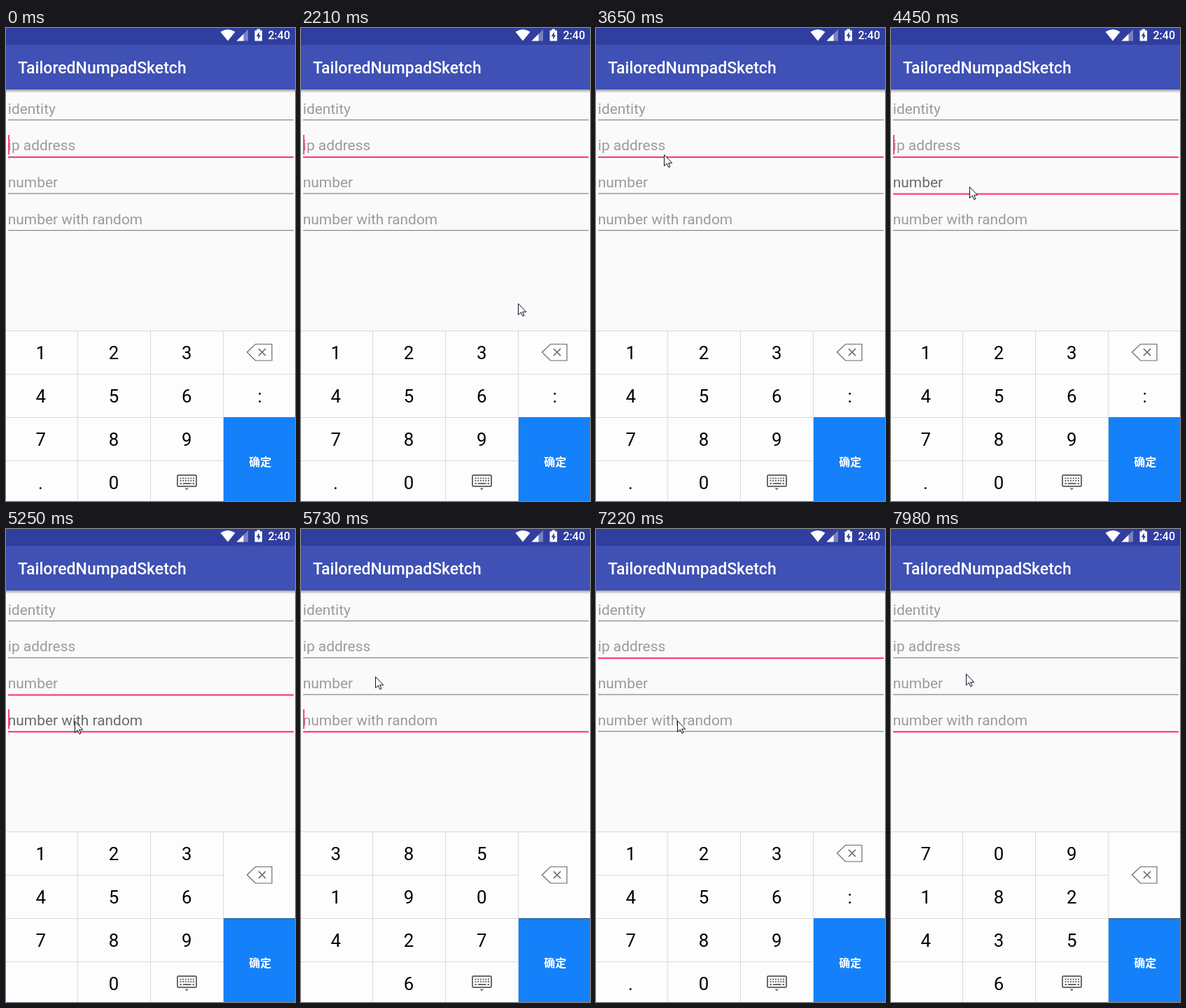
These frames come from a looping animation (413 px wide and 677 px high, 8 s). An HTML page:

```html
<!DOCTYPE html>
<html lang="zh-CN">
<head>
<meta charset="utf-8">
<title>Numpad demo</title>
<style>
html, body { margin: 0; width: 100%; height: 100%; overflow: hidden; background: #fafafa; }
svg { display: block; width: 413px; height: 677px; font-family: Roboto, sans-serif; }
.key { font-size: 25.8px; text-anchor: middle; }
.hint { font-size: 20.9px; }
.white { fill: #fff; font-weight: 500; }
.ok { font: 700 16px 'Noto Sans CJK SC', 'Noto Sans CJK', sans-serif; text-anchor: middle; }
.grid { stroke: #d9d9d9; fill: none; }
.icon { stroke: #6a6a6a; fill: none; }
</style>
</head>
<body>
<svg viewBox="0 0 413 677">
  <defs>
    <linearGradient id="shade" x2="0" y2="1">
      <stop stop-opacity=".35"/>
      <stop offset="1" stop-opacity="0"/>
    </linearGradient>
  </defs>
  <rect width="413" height="677" fill="#fafafa"/>
  <rect width="413" height="88" fill="#3f51b5"/>
  <rect width="413" height="24" fill="#303f9f"/>
  <rect y="88" width="413" height="5" fill="url(#shade)"/>
  <text class="white" x="17" y="65" font-size="23">TailoredNumpadSketch</text>

  <!-- status icons -->
  <path d="M317 18.5L306.5 5.5Q317-1.5 327.5 5.5Z" fill="#fff"/>
  <path d="M329.5 18.5H346V2Z" fill="#fff" opacity=".35"/>
  <path d="M329.5 18.5H339.5V8.5Z" fill="#fff"/>
  <path d="M355.5 3.5H358.5V1.5H363V3.5H366V18.5H355.5Z" fill="#fff"/>
  <path d="M361.8 5.5L357.7 11.8H360.2V16.5L364 10.2H361.8Z" fill="#303f9f"/>
  <text class="white" x="374.5" y="16.3" font-size="16">2:40</text>

  <g id="fields"></g>
  <rect id="caret" x="3" width="2" height="28" fill="#ff4081"/>

  <!-- keyboard -->
  <rect y="433" width="413" height="244" fill="#fdfdfd"/>
  <path class="grid" d="M0 433.5H413M0 495.5H310M0 557.5H310M0 619.5H310M102.5 433V677M206.5 433V677M310.5 433V677"/>
  <rect x="311" y="557" width="102" height="120" fill="#1481fa"/>
  <text class="white ok" x="363.3" y="626.5">确定</text>
  <g id="digits"></g>
  <g id="ipKeys">
    <path class="grid" d="M311 495.5H413"/>
    <text class="key" x="362.5" y="536">:</text>
    <text class="key" x="49.5" y="660">.</text>
  </g>
  <path id="edge" d="M311 557.5H413" stroke="#30587f"/>
  <g id="del" class="icon">
    <path d="M344.5 0L356.5-11.5H380V12H356.5Z" stroke-width="1.2"/>
    <path d="M361-5L371 5M371-5L361 5" stroke-width="1.7"/>
  </g>
  <g class="icon" stroke-width="2">
    <rect x="245" y="640" width="27" height="16" rx="1.5"/>
    <path d="M248.5 644.5H269M248.5 648H269" stroke-dasharray="2 1.7"/>
    <path d="M248.5 652H251M253 652H264.5M266.5 652H269"/>
    <path d="M255.5 658.5H261L258.3 661.5Z" fill="#6a6a6a" stroke="none"/>
  </g>

  <path id="cursor" d="M.5.5V16.5L4.3 13L6.8 18.5L9 17.5L6.6 12.3H11.7Z" fill="#fff" stroke="#112"/>
</svg>
<script>
const LOOP = 8000, PITCH = 52.7, BLINK = 500;
const FOCUS_DELAY = 40, BOARD_DELAY = 80, PRESS = 120;
const IP = 1, NUM = 2, RAND = 3;
const ORDERED = '1234567890';
const $ = id => document.getElementById(id);

const tap = (time, row, keys = ORDERED) => ({ time, row, keys });
const taps = [
  tap(-BOARD_DELAY, IP),
  tap(4450, NUM),
  tap(5210, RAND, '3851904276'),
  tap(6340, NUM),
  tap(6600, IP),
  tap(7440, RAND, '7091824356')
];

// the pointer glides to (x, y) between two times and rests until the next move
const move = (from, to, x, y) => ({ from, to, x, y });
const moves = [
  move(120, 120, 329, 651),
  move(120, 360, 310, 394),
  move(2450, 2590, 300, 471),
  move(2590, 2970, 116, 236),
  move(2970, 3370, 97, 180),
  move(3610, 4050, 112, 227),
  move(4530, 4850, 98, 275),
  move(5330, 5730, 106, 211),
  move(6380, 6540, 107, 162),
  move(6720, 7220, 116, 274),
  move(7540, 7980, 107, 207)
];

const add = (parent, tag, attrs, text = '') => {
  const el = document.createElementNS('http://www.w3.org/2000/svg', tag);
  for (const k in attrs) el.setAttribute(k, attrs[k]);
  el.textContent = text;
  return parent.appendChild(el);
};

const fields = ['identity', 'ip address', 'number', 'number with random'].map((name, i) => ({
  hint: add($('fields'), 'text', { class: 'hint', x: 2.8, y: Math.floor(123 + i * PITCH) }, name),
  line: add($('fields'), 'rect', { x: 3, y: 131 + i * PITCH, width: 408 })
}));

const digits = [...ORDERED].map((d, i) => add($('digits'), 'text', {
  class: 'key',
  x: 49.8 + (i === 9 ? 1 : i % 3) * 104.2,
  y: 474 + Math.floor(i / 3) * 62
}, d));

const lastTap = t => taps.findLast(p => p.time <= t);
const smooth = k => k * k * (3 - 2 * k);

function cursorAt(t) {
  const i = moves.findLastIndex(m => m.from <= t);
  const b = moves[i], a = moves[i - 1];
  const k = smooth(Math.min(1, (t - b.from) / (b.to - b.from)));
  return [a.x + (b.x - a.x) * k, a.y + (b.y - a.y) * k].map(Math.round);
}

function draw(t) {
  const pressed = lastTap(t);
  const focused = lastTap(t - FOCUS_DELAY);
  const fading = lastTap(Math.max(0, t - PRESS));
  const board = lastTap(t - BOARD_DELAY);
  const isPressed = t - pressed.time < PRESS;

  fields.forEach(({ hint, line }, i) => {
    const lit = [pressed, focused, fading].some(p => p.row === i);
    hint.setAttribute('fill', isPressed && i === pressed.row && t > PRESS ? '#6b6b6b' : '#9b9b9b');
    line.setAttribute('fill', lit ? '#ff4081' : '#808080');
    line.setAttribute('height', lit ? 2.3 : 1.15);
  });

  const sinceFocus = t - focused.time - FOCUS_DELAY;
  const blinkStart = focused === taps[0] ? t : sinceFocus;
  $('caret').setAttribute('y', Math.round(100.3 + focused.row * PITCH));
  $('caret').setAttribute('opacity', +(blinkStart % (2 * BLINK) < BLINK));

  const withIp = board.row === IP;
  digits.forEach((el, i) => { el.textContent = board.keys[i]; });
  $('ipKeys').setAttribute('opacity', +withIp);
  $('edge').setAttribute('opacity', +!withIp);
  $('del').setAttribute('transform', `translate(0 ${withIp ? 464 : 495})`);

  const shown = t >= moves[0].from;
  $('cursor').setAttribute('opacity', +shown);
  if (shown) $('cursor').setAttribute('transform', `translate(${cursorAt(t)})`);
}

const start = performance.now();
function tick() {
  draw((performance.now() - start) % LOOP);
  requestAnimationFrame(tick);
}
tick();
</script>
</body>
</html>
```
